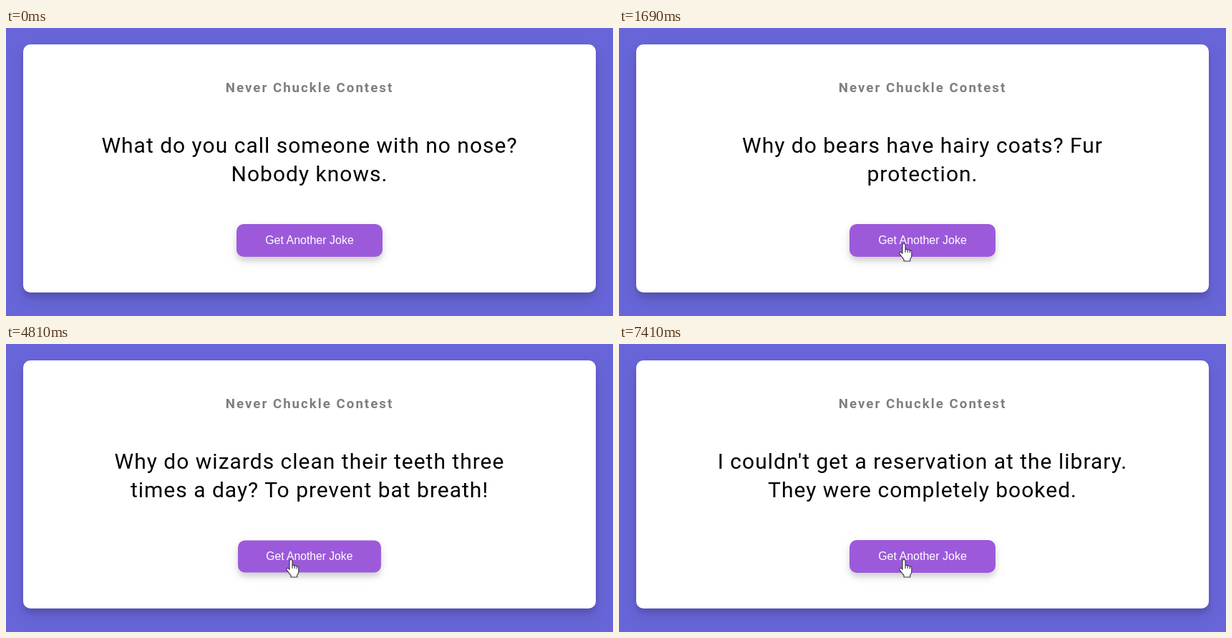
Recreate the animation shown at these times as an HTML page. Size 848 by 404 pixels, loop 8 s.

```html
<!DOCTYPE html>
<html lang="en">
<head>
<meta charset="utf-8">
<title>Joke card</title>
<style>
  html, body { margin: 0; width: 100%; height: 100%; overflow: hidden; background: #6865d8; }
  .card {
    position: absolute; left: 24px; top: 23px; width: 800px; height: 348px;
    box-sizing: border-box; padding: 50px 20px;
    background: #fff; border-radius: 10px; text-align: center;
    font-family: Roboto, sans-serif; color: #000;
    box-shadow: 0 10px 20px rgba(0,0,0,.1), 0 6px 6px rgba(0,0,0,.1);
  }
  h3 { margin: 0; font-size: 18.72px; line-height: 22px; letter-spacing: 2px; opacity: .5; }
  .joke {
    margin: 50px auto; height: 80px; white-space: pre;
    font-size: 30px; line-height: 40px; letter-spacing: 1px;
  }
  button {
    display: block; margin: 0 auto; height: 46px; padding: 14px 40px;
    border: 0; border-radius: 10px; background: #9c5adb; color: #fff;
    font: 16px/18px "Liberation Sans", Arial, sans-serif;
    box-shadow: 0 5px 15px rgba(0,0,0,.1), 0 6px 6px rgba(0,0,0,.1);
  }
  svg { position: absolute; left: 0; top: 0; overflow: visible; }
  svg path { fill: #fff; stroke: #33333d; stroke-width: 1.1; stroke-linejoin: round; }
</style>
</head>
<body>
<div class="card">
  <h3>Never Chuckle Contest</h3>
  <div class="joke"></div>
  <button>Get Another Joke</button>
</div>
<svg width="20" height="26"><path/></svg>
<script>
const LOOP = 8000, STEP = 130, REPLY_DELAY = 260;
const jokes = [
  "What do you call someone with no nose?\nNobody knows.",
  "Why do bears have hairy coats? Fur\nprotection.",
  "Why do wizards clean their teeth three\ntimes a day? To prevent bat breath!",
  "What do you call a cow with two legs?\nLean beef.",
  "I couldn't get a reservation at the library.\nThey were completely booked."
];
const clicks = [
  { down: 1170, up: 1430 }, { down: 2990, up: 3120 },
  { down: 4810, up: 5070 }, { down: 7020, up: 7150 }
];

// Both shapes have their hot spot at 0,0.
const HAND = "M-2 1.5Q-2 -.5 0 -.5T2 1.5V8Q3.8 6.6 5.2 8.4Q7 7.2 8.3 9.2Q10.8 8.6 10.8 11V16" +
  "Q10.8 19 8.8 21V24H0V21.5Q-2.5 19 -6 13.5Q-6.6 11.2 -4.6 11.2Q-3.4 11.4 -2 13.5Z" +
  "M2 8V12M5.2 8.6V12M8.3 9.4V12.4";
const ARROW = "M0 0V17L4 13.4L6.6 19.4L9.4 18.2L6.8 12.4H12Z";

const joke = document.querySelector(".joke");
const button = document.querySelector("button");
const cursor = document.querySelector("svg");
const shape = cursor.querySelector("path");

function drawCursor(t) {
  const entered = t >= 390;
  cursor.style.visibility = entered ? "visible" : "hidden";
  if (!entered) return;
  // Glides in from the lower left and settles on the button.
  const tick = Math.floor(t / STEP);
  const rest = 2.6 ** (5 - tick);
  const x = Math.round(398 - 5 * rest), y = Math.round(303 + 6 * rest);
  cursor.style.transform = `translate(${x}px, ${y}px)`;
  shape.setAttribute("d", y < 321 ? HAND : ARROW);
}

function draw(t) {
  const text = jokes[clicks.filter(c => t >= c.up + REPLY_DELAY).length];
  if (joke.textContent !== text) joke.textContent = text;
  const pressed = clicks.some(c => t >= c.down && t < c.up);
  button.style.transform = pressed ? "scale(.98)" : "none";
  drawCursor(t);
}

const start = performance.now();
function frame() {
  draw((performance.now() - start) % LOOP);
  requestAnimationFrame(frame);
}
frame();
</script>
</body>
</html>
```
